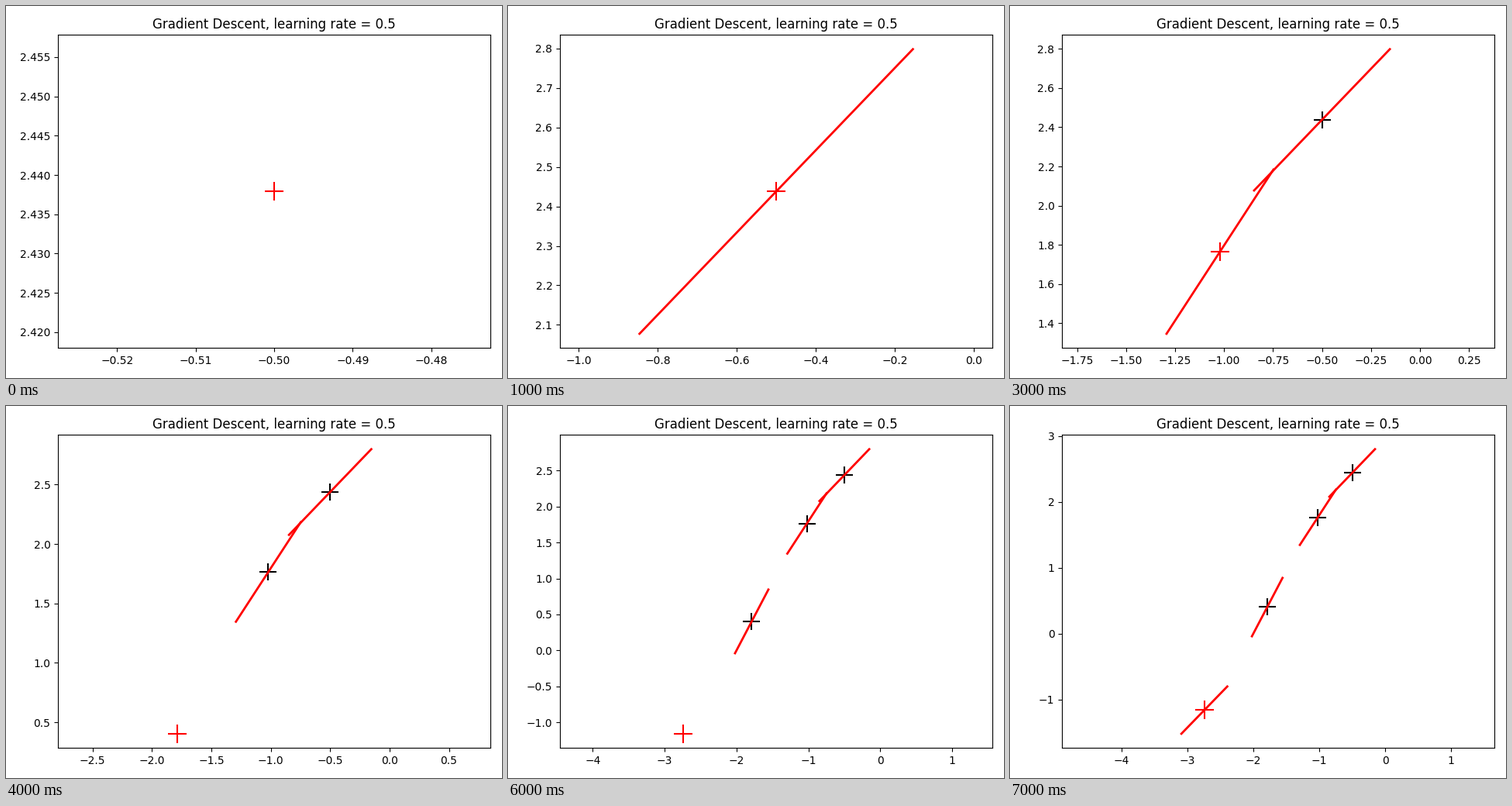
A matplotlib script for the animation above (8 s loop, 640 by 480 pixels).

```python
import numpy as np
import matplotlib.pyplot as plt
from matplotlib.animation import FuncAnimation

RATE = 0.5
START = -0.5
SLOPES = [1.041, 1.536, 1.908, 1.03]
HEIGHTS = [2.4379, 1.765, 0.403, -1.16]

# each step moves against the slope
xs = START - RATE * np.concatenate([[0], np.cumsum(SLOPES[:-1])])

fig, ax = plt.subplots(figsize=(6.4, 4.8), dpi=100)


def reset():
    ax.clear()
    ax.axis("equal")
    ax.set_title(f"Gradient Descent, learning rate = {RATE}")


def tangent(i):
    """Draw a tangent of unit length centred on point i."""
    dx = 0.5 / np.hypot(1, SLOPES[i])
    dy = SLOPES[i] * dx
    x, y = xs[i], HEIGHTS[i]
    ax.plot([x - dx, x + dx], [y - dy, y + dy], color="red", lw=2)


def update(frame):
    reset()
    step, show_tangent = divmod(frame, 2)
    ax.scatter(xs[:step], HEIGHTS[:step], s=250, c="black", marker="+")
    ax.scatter(xs[step], HEIGHTS[step], s=300, c="red", marker="+")
    for i in range(step + show_tangent):
        tangent(i)


reset()
fig.tight_layout()
anim = FuncAnimation(fig, update, frames=2 * len(xs), init_func=reset,
                     interval=1000, repeat=True, repeat_delay=0)
plt.show()
```
